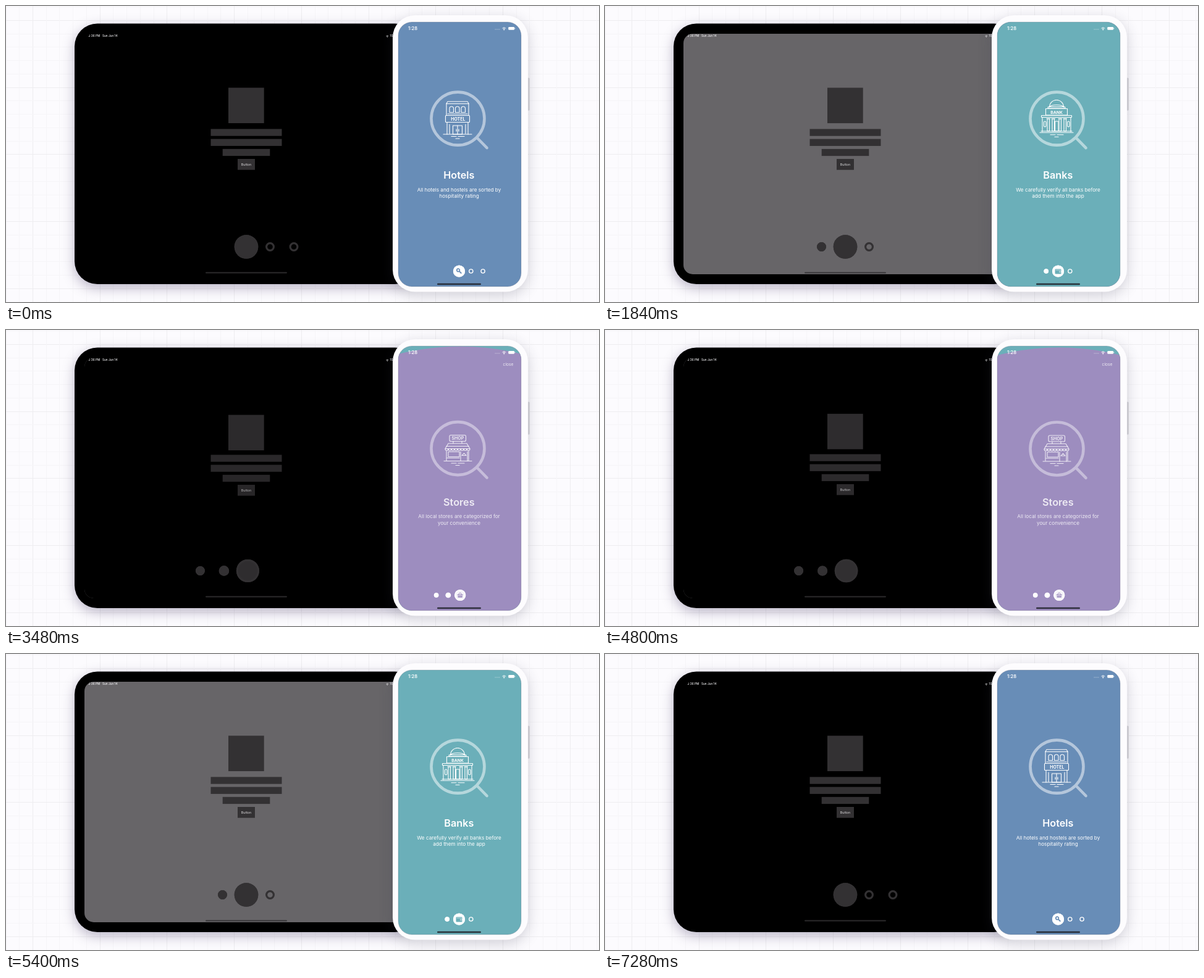
Write an HTML page with a canvas that moves like this. It is 960 by 480 pixels and loops after 7.32 s.

```html
<!DOCTYPE html>
<html lang="en">
<head>
<meta charset="utf-8">
<title>Onboarding pages</title>
<style>
html, body { margin: 0; width: 100%; height: 100%; overflow: hidden; background: #fcfbfe; }
canvas { display: block; width: 960px; height: 480px; }
</style>
</head>
<body>
<canvas id="stage" width="960" height="480"></canvas>
<script>
const canvas = document.getElementById('stage');
const ctx = canvas.getContext('2d');
const LOOP = 7320;
const SWIPE = 640;
const FONT = 'Inter, Roboto, sans-serif';

// Swipe starts: to page 1, to page 2, back to 1, back to 0.
const phone = {
  starts: [1210, 2963, 4676, 6397], hold: 0,
  colors: ['#688db7', '#6bafb9', '#9d8dbf'],
  x: 635, y: 26, w: 199, h: 429, r: 22,
  dots: { x: 733.5, y: 430, gap: 19.3, small: 3.8, big: 9.6, line: 1.4, color: '#fff' },
  reach: 442
};
const tablet = {
  starts: [1212, 2944, 4718, 6449], hold: 3060,
  colors: ['#000', '#676568', '#000'],
  x: 127, y: 45, w: 524, h: 390, r: 15,
  dots: { x: 389, y: 390.5, gap: 38.5, small: 7.5, big: 19.3, line: 3.2, color: '#333133' },
  reach: 470
};

const pages = [
  { title: 'Hotels', lines: ['All hotels and hostels are sorted by', 'hospitality rating'], art: hotel, glyph: lens },
  { title: 'Banks', lines: ['We carefully verify all banks before', 'add them into the app'], art: bank, glyph: wallet },
  { title: 'Stores', lines: ['All local stores are categorized for', 'your convenience'], art: shop, glyph: basket }
];

const clamp = v => Math.max(0, Math.min(1, v));
const ease = v => (1 - Math.cos(Math.PI * clamp(v))) / 2;

function pageAt(dev, t) {
  const [a, b, c, d] = dev.starts.map(s => ease((t - s) / SWIPE));
  return a + (t < dev.hold ? 0 : b) - c - d;
}

function box(x, y, w, h, r = 0, g = ctx) {
  g.beginPath();
  g.roundRect(x, y, w, h, r);
}

function line(...pts) {
  ctx.beginPath();
  for (let i = 0; i < pts.length; i += 2) ctx.lineTo(pts[i], pts[i + 1]);
  ctx.stroke();
}

function frame(x, y, w, h, r) {
  box(x, y, w, h, r);
  ctx.stroke();
}

function disc(x, y, r) {
  ctx.beginPath();
  ctx.arc(x, y, r, 0, Math.PI * 2);
}

function text(str, x, y, size, weight = 400, align = 'center') {
  ctx.font = `${weight} ${size}px ${FONT}`;
  ctx.textAlign = align;
  ctx.fillText(str, x, y);
}

// Page art, drawn in white outlines
function ground(x0, x1, y) {
  line(x0, y, x1, y);
  line(721, y + 3.5, 729, y + 3.5);
  line(732, y + 3.5, 742, y + 3.5);
  line(728, y + 7, 734, y + 7);
}

function hotel() {
  line(713, 177, 713, 158, 715, 155, 747, 155, 749, 158, 749, 177);
  line(713, 158.5, 749, 158.5);
  for (const x of [718, 727.5, 737]) {
    box(x, 163, 6.5, 9.5, [3.2, 3.2, 0, 0]);
    ctx.stroke();
  }
  line(715, 175, 747, 175);
  frame(711.5, 177.5, 39, 11, 1);
  text('HOTEL', 731.8, 185.7, 7, 700);
  line(714, 189, 714, 208);
  line(748, 189, 748, 208);
  line(718, 192, 718, 207);
  line(744, 192, 744, 207);
  frame(723.5, 194, 15, 14);
  line(731, 194, 731, 208);
  line(729, 200, 729, 203);
  line(733, 200, 733, 203);
  ground(708, 754, 208);
}

function bank() {
  ctx.beginPath();
  ctx.arc(731, 164, 11.5, Math.PI, 0);
  ctx.stroke();
  line(729, 152.5, 733, 152.5);
  ctx.beginPath();
  ctx.ellipse(731, 164, 11.5, 3.5, 0, Math.PI, 0);
  ctx.stroke();
  frame(717, 163.5, 28, 2.5, 1);
  frame(713.5, 166.5, 35, 10.5);
  text('BANK', 731, 174.6, 6.8, 700);
  frame(706.5, 177.5, 49, 3, 0.5);
  for (const x of [716, 724, 735, 743]) {
    frame(x, 183, 3.5, 20);
    line(x - 1, 182.5, x + 4.5, 182.5);
  }
  line(708, 181, 708, 204);
  line(754, 181, 754, 204);
  frame(710.5, 187, 3.5, 9, 1.7);
  frame(748.5, 187, 3.5, 9, 1.7);
  frame(728.5, 187, 5.5, 16);
  line(706, 203, 756, 203);
  ground(704, 758, 205.2);
}

function shop() {
  frame(718, 161, 26.5, 10, 2);
  text('SHOP', 731.3, 169, 7, 700);
  line(724, 171, 724, 174);
  line(738, 171, 738, 174);
  line(711, 183, 716, 174.5, 746, 174.5, 751, 183, 711, 183);
  line(713, 179, 749, 179);
  for (let i = 0; i < 8; i++) {
    ctx.beginPath();
    ctx.arc(713.5 + i * 5, 183.5, 2.5, 0, Math.PI);
    ctx.stroke();
  }
  line(713, 187, 713, 202);
  line(749, 187, 749, 202);
  frame(716, 188, 18, 8);
  line(714, 198, 734, 198);
  line(736, 203, 736, 188);
  line(747, 203, 747, 188);
  line(738, 194, 741.5, 190.5, 745, 194, 738, 194);
  ground(709, 754, 203);
}

// Small glyphs inside the active dot, centred on 0,0
function lens() {
  ctx.lineWidth = 1.7;
  disc(-1.4, -1.6, 2.3);
  ctx.stroke();
  ctx.lineWidth = 2;
  line(0.6, 0.4, 3.8, 3.6);
}

function wallet() {
  box(-5, -3.5, 10, 8, 1);
  ctx.fill();
  ctx.strokeStyle = '#fff';
  ctx.lineWidth = 0.6;
  line(-4, -1.9, 5, -1.9);
  frame(2, 0, 3, 2, 0.5);
}

function basket() {
  ctx.lineWidth = 1;
  line(-2.8, -0.5, -1.2, -3.6, 1.2, -3.6, 2.8, -0.5);
  box(-4.6, -1.4, 9.2, 1.6, 0.6);
  ctx.fill();
  box(-3.8, 0.7, 7.6, 3.4, [0, 0, 1.2, 1.2]);
  ctx.fill();
}

function backdrop() {
  const c = document.createElement('canvas');
  c.width = 960;
  c.height = 480;
  const g = c.getContext('2d');
  g.fillStyle = '#fcfbfe';
  g.fillRect(0, 0, 960, 480);
  const step = 21.74;
  for (let i = -2; i < 45; i++) {
    g.fillStyle = (i + 5) % 5 ? '#f6f5f8' : '#eeedf0';
    g.fillRect(Math.round(43 + i * step), 0, 1, 480);
    g.fillRect(0, Math.round(23 + i * step), 960, 1);
  }
  g.shadowColor = 'rgba(70,55,100,.36)';
  g.shadowBlur = 20;
  g.shadowOffsetY = 6;
  g.fillStyle = '#000';
  box(111, 28.5, 556, 422.5, 37, g);
  g.fill();
  return c;
}

function phoneShell() {
  const c = document.createElement('canvas');
  c.width = 960;
  c.height = 480;
  const g = c.getContext('2d');
  g.fillStyle = '#dcdbdf';
  box(843, 116.5, 5, 53, 1.5, g);
  g.fill();
  g.shadowColor = 'rgba(50,50,75,.22)';
  g.shadowBlur = 22;
  g.shadowOffsetY = 6;
  g.fillStyle = '#fdfcfe';
  box(626, 15, 219, 448.5, 36, g);
  g.fill();
  return c;
}

const back = backdrop();
const shell = phoneShell();

function wash(dev, pos) {
  const i = Math.floor(pos), f = pos - i, d = dev.dots;
  ctx.fillStyle = dev.colors[i];
  ctx.fillRect(dev.x, dev.y, dev.w, dev.h);
  if (f > 0) {
    ctx.fillStyle = dev.colors[i + 1];
    disc(d.x + (1 - f) * d.gap, d.y, f * dev.reach);
    ctx.fill();
  }
}

function pager(dev, pos) {
  const d = dev.dots;
  pages.forEach((page, k) => {
    const off = k - pos, near = clamp(1 - Math.abs(off));
    const r = d.small + (d.big - d.small) * near;
    const x = d.x + off * d.gap;
    ctx.fillStyle = ctx.strokeStyle = d.color;
    ctx.globalAlpha = off > 0 ? near : 1;
    disc(x, d.y, r);
    ctx.fill();
    ctx.globalAlpha = 1;
    ctx.lineWidth = d.line;
    disc(x, d.y, r - d.line / 2);
    ctx.stroke();
    if (dev === phone && near > 0.5) {
      ctx.save();
      ctx.translate(x, d.y);
      ctx.globalAlpha = 2 * near - 1;
      ctx.fillStyle = ctx.strokeStyle = dev.colors[k];
      page.glyph();
      ctx.restore();
    }
  });
}

// Distance moved by a layer of a page that is off by some amount
const slide = (off, inFrom, outTo) => off > 0 ? off * inFrom : off * outTo;

function wifi(x, y, s) {
  ctx.lineWidth = s * 0.22;
  ctx.strokeStyle = '#fff';
  for (const k of [0.5, 0.9]) {
    ctx.beginPath();
    ctx.arc(x, y, s * k, -Math.PI * 0.76, -Math.PI * 0.24);
    ctx.stroke();
  }
  disc(x, y - s * 0.08, s * 0.2);
  ctx.fill();
}

function drawTablet(pos) {
  ctx.save();
  box(tablet.x, tablet.y, tablet.w, tablet.h, tablet.r);
  ctx.clip();
  wash(tablet, pos);
  pages.forEach((_, k) => {
    const off = k - pos, far = Math.abs(off);
    if (far >= 0.5) return;
    const dy = slide(off, 82, 71), dt = slide(off, 48, 71);
    ctx.fillStyle = '#333133';
    ctx.globalAlpha = 1 - 2 * far;
    ctx.fillRect(360, 132.5 + dy, 57.7, 57.5);
    ctx.globalAlpha = clamp(1 - 2.7 * far);
    ctx.fillRect(331.5, 199.4 + dt, 115, 11.3);
    ctx.fillRect(331.5, 215.6 + dt, 115, 11.3);
    ctx.globalAlpha = clamp(1 - 3.4 * far);
    ctx.fillRect(350.7, 231.8 + dt, 76.6, 11.3);
    ctx.fillRect(375, 248 + dt, 28, 17.7);
    ctx.fillStyle = '#dddcde';
    text('Button', 389, 258.6 + dt, 5.3);
  });
  ctx.globalAlpha = 1;
  pager(tablet, pos);
  ctx.fillStyle = 'rgba(51,49,51,.88)';
  box(323, 431.4, 132, 2.2, 1.1);
  ctx.fill();
  ctx.fillStyle = '#f4f3f5';
  text('2:36 PM', 133.5, 50.4, 4.7, 500, 'left');
  text('Sun Jun 14', 156, 50.4, 4.7, 500, 'left');
  text('100%', 621.5, 50.4, 4.7, 500, 'left');
  wifi(617.3, 50.5, 2.8);
  ctx.restore();
}

function drawPage(page, off) {
  const far = Math.abs(off);
  if (far >= 0.5) return;
  ctx.save();
  const alpha = 1 - 2 * far;
  ctx.fillStyle = ctx.strokeStyle = '#fff';
  ctx.lineCap = ctx.lineJoin = 'round';
  ctx.save();
  ctx.translate(0, slide(off, 109, 75));
  ctx.globalAlpha = alpha * 0.5;
  ctx.lineWidth = 4.6;
  ctx.beginPath();
  ctx.arc(731.5, 182.6, 43, Math.PI / 4, Math.PI * 2.25);
  ctx.lineTo(778.5, 230);
  ctx.stroke();
  ctx.globalAlpha = alpha;
  ctx.lineWidth = 1.1;
  page.art();
  ctx.restore();
  ctx.translate(0, slide(off, 54, 75));
  ctx.globalAlpha = alpha;
  text(page.title, 733.3, 280, 16.2, 600);
  page.lines.forEach((s, i) => text(s, 733.5, 300.5 + i * 10.4, 8.2));
  ctx.restore();
}

function drawPhone(pos) {
  ctx.drawImage(shell, 0, 0);
  ctx.save();
  box(phone.x, phone.y, phone.w, phone.h, phone.r);
  ctx.clip();
  wash(phone, pos);
  pages.forEach((page, k) => drawPage(page, k - pos));
  pager(phone, pos);
  ctx.fillStyle = '#fff';
  const close = clamp(2 * pos - 3);
  if (close > 0) {
    ctx.globalAlpha = close;
    text('close', 821.5, 58, 6.7, 400, 'right');
    ctx.globalAlpha = 1;
  }
  text('1:28', 651, 39, 7.5, 600, 'left');
  ctx.globalAlpha = 0.45;
  for (let i = 0; i < 4; i++) ctx.fillRect(791.5 + i * 2.2, 37.4, 1.4, 1);
  ctx.globalAlpha = 1;
  wifi(806.3, 38.8, 4.2);
  box(813.3, 34, 9.7, 4.8, 1.3);
  ctx.fill();
  ctx.fillRect(823.5, 35.5, 0.8, 1.8);
  ctx.fillStyle = 'rgba(30,34,42,.88)';
  box(698, 449.7, 71, 2.6, 1.3);
  ctx.fill();
  ctx.restore();
  ctx.strokeStyle = 'rgba(110,110,125,.4)';
  ctx.lineWidth = 0.7;
  frame(phone.x, phone.y, phone.w, phone.h, phone.r);
}

function draw(now) {
  const t = now % LOOP;
  ctx.globalAlpha = 1;
  ctx.drawImage(back, 0, 0);
  drawTablet(pageAt(tablet, t));
  drawPhone(pageAt(phone, t));
}

const begin = performance.now();
function tick() {
  draw(performance.now() - begin);
  requestAnimationFrame(tick);
}
tick();
</script>
</body>
</html>
```
